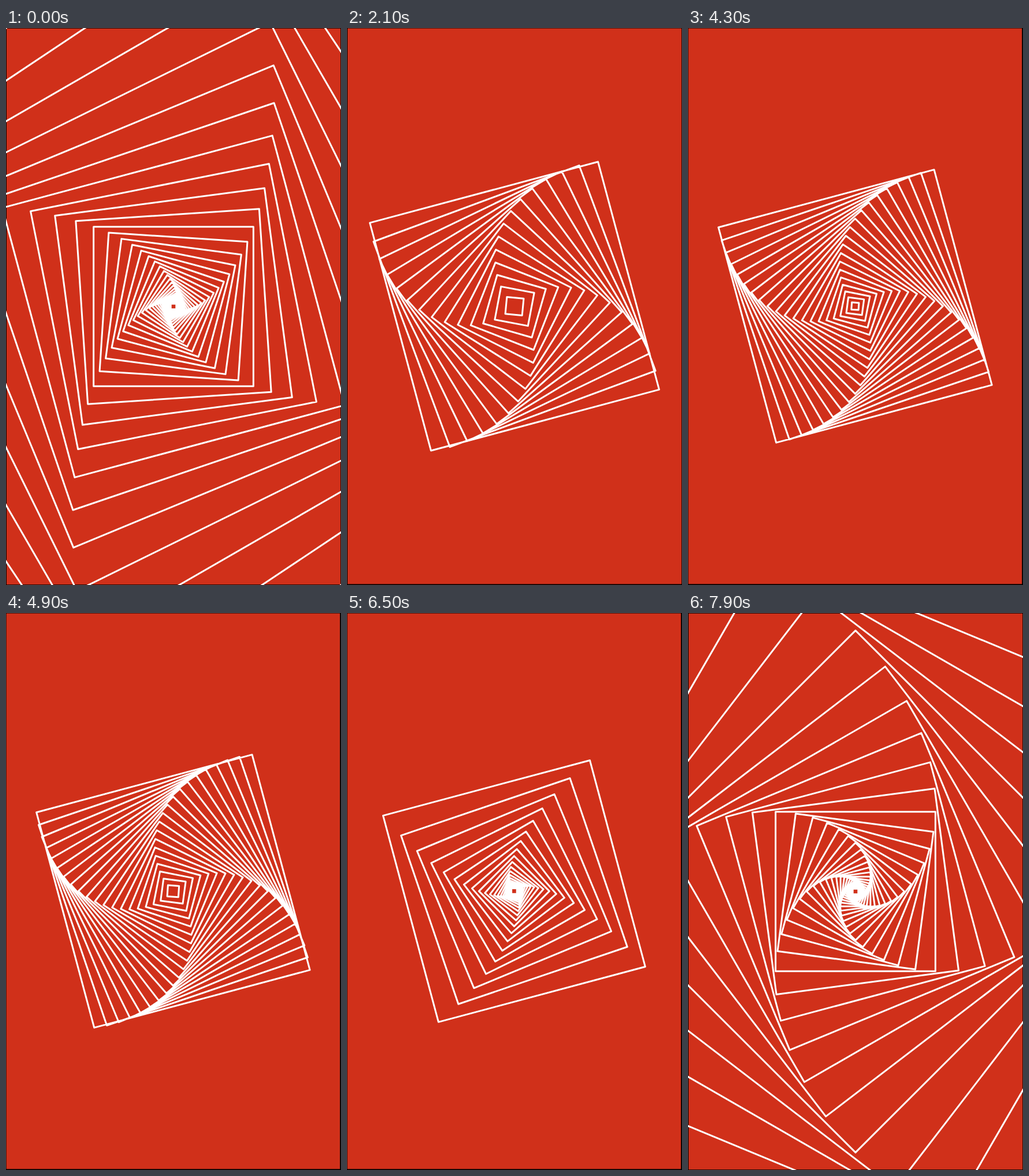
Animation, 580 px wide and 966 px high, one loop 8 s. Source, as an HTML page:

```html
<!DOCTYPE html>
<html lang="en">
<head>
<meta charset="utf-8">
<title>Rotating squares</title>
<style>
  html, body { margin: 0; width: 580px; height: 966px; overflow: hidden; background: #fff; }
  svg { display: block; }
</style>
</head>
<body>
<svg width="580" height="966" viewBox="0 0 580 966">
  <rect id="frame"/>
  <rect id="board" fill="#d0301a"/>
  <path id="lines" fill="none" stroke-width="3" stroke-linejoin="round" stroke-linecap="round"/>
</svg>
<script>
const LOOP = 8000;
const [frame, board, lines] = ['frame', 'board', 'lines'].map(id => document.getElementById(id));

// Canvas variants: outer size, edges of the red area and centre of the squares.
const SMALL = { w: 580, h: 580, left: 1, top: 1, right: 579, bottom: 578.5, cx: 290.3, cy: 290 };
const TALL = { w: 580, h: 966, left: 1, top: 0.8, right: 579.2, bottom: 965.2, cx: 290, cy: 483 };
const LOW = { ...TALL, top: 0.6, bottom: 964.4, cy: 482.5 };
const NARROW = { ...TALL, left: 0.6, top: 0.6, right: 578.2, bottom: 964.3, cx: 289.4, cy: 482.4 };

// Even spacing: n squares growing to half-side `span`, turning by `turn` degrees in all.
const even = (n, span, turn = 75, power = 1) =>
  Array.from({ length: n }, (_, i) => {
    const u = (i + 1) / n;
    return [span * u ** power, turn * u];
  });

// Geometric spacing: each square is `ratio` times the last one, turned by `step` degrees.
const geometric = (ratio, step, n = 42) =>
  Array.from({ length: n }, (_, i) => [580 / 120 * ratio ** i, step * i]);

const scene = (start, canvas, squares, color = '#fff', closed = true) =>
  ({ start, canvas, squares, color, closed });

const scenes = [
  scene(0, TALL, geometric(1.15, -3.75)),
  scene(500, SMALL, even(1, 215.2, 0), '#000', false),
  scene(700, SMALL, even(10, 215.2, 0), '#000', false),
  scene(900, SMALL, even(10, 215.2, 37.5), '#000', false),
  scene(1100, SMALL, even(10, 215.2), '#000', false),
  scene(1300, SMALL, even(10, 215.2), '#000'),
  scene(1500, LOW, even(10, 204.5), '#000'),
  scene(1700, LOW, even(10, 204.5)),
  ...[12, 14, 16, 18].map((n, i) => scene(1900 + 200 * i, LOW, even(n, 204.5))),
  scene(2900, LOW, even(20, 204.5)),
  scene(3500, LOW, even(20, 322)),
  scene(3700, NARROW, even(20, 322)),
  ...[[3900, 1], [4300, 1.15], [4500, 1.3], [4700, 1.15], [4900, 1], [5100, 1.3], [5300, 1.6]]
    .map(([start, power]) => scene(start, NARROW, even(20, 193.3, 75, power))),
  ...[1, 1.01, 1.05, 1.1, 1.15, 1.2]
    .map((ratio, i) => scene(5500 + 200 * i, NARROW, geometric(ratio, 3.75, 21))),
  scene(6700, NARROW, geometric(1.2, 3.75, 24)),
  scene(6900, NARROW, geometric(1.2, 3.75)),
  scene(7300, TALL, geometric(1.2, 3.75)),
  scene(7500, TALL, geometric(1.2, -3.75)),
  scene(7700, TALL, geometric(1.15, -3.75)),
  scene(7900, TALL, geometric(1.15, -7.5))
];

function squarePath([half, degrees], { cx, cy }, closed) {
  const a = degrees * Math.PI / 180;
  const x = half * (Math.cos(a) + Math.sin(a));
  const y = half * (Math.cos(a) - Math.sin(a));
  const points = [[-x, y], [-y, -x], [x, -y], [y, x]];
  return 'M' + points.map(([px, py]) => `${(cx + px).toFixed(2)} ${(cy + py).toFixed(2)}`).join('L')
    + (closed ? 'Z' : '');
}

function setRect(rect, x, y, width, height) {
  Object.entries({ x, y, width, height }).forEach(([key, value]) => rect.setAttribute(key, value));
}

let shown;
function draw(time) {
  const current = scenes.findLast(s => s.start <= time);
  if (current === shown) return;
  shown = current;
  const { canvas: c, squares, color, closed } = current;
  setRect(frame, 0, 0, c.w, c.h);
  setRect(board, c.left, c.top, c.right - c.left, c.bottom - c.top);
  lines.setAttribute('stroke', color);
  lines.setAttribute('d', squares.map(s => squarePath(s, c, closed)).join(''));
}

const origin = performance.now();
function tick() {
  draw((performance.now() - origin) % LOOP);
  requestAnimationFrame(tick);
}
tick();
</script>
</body>
</html>
```
